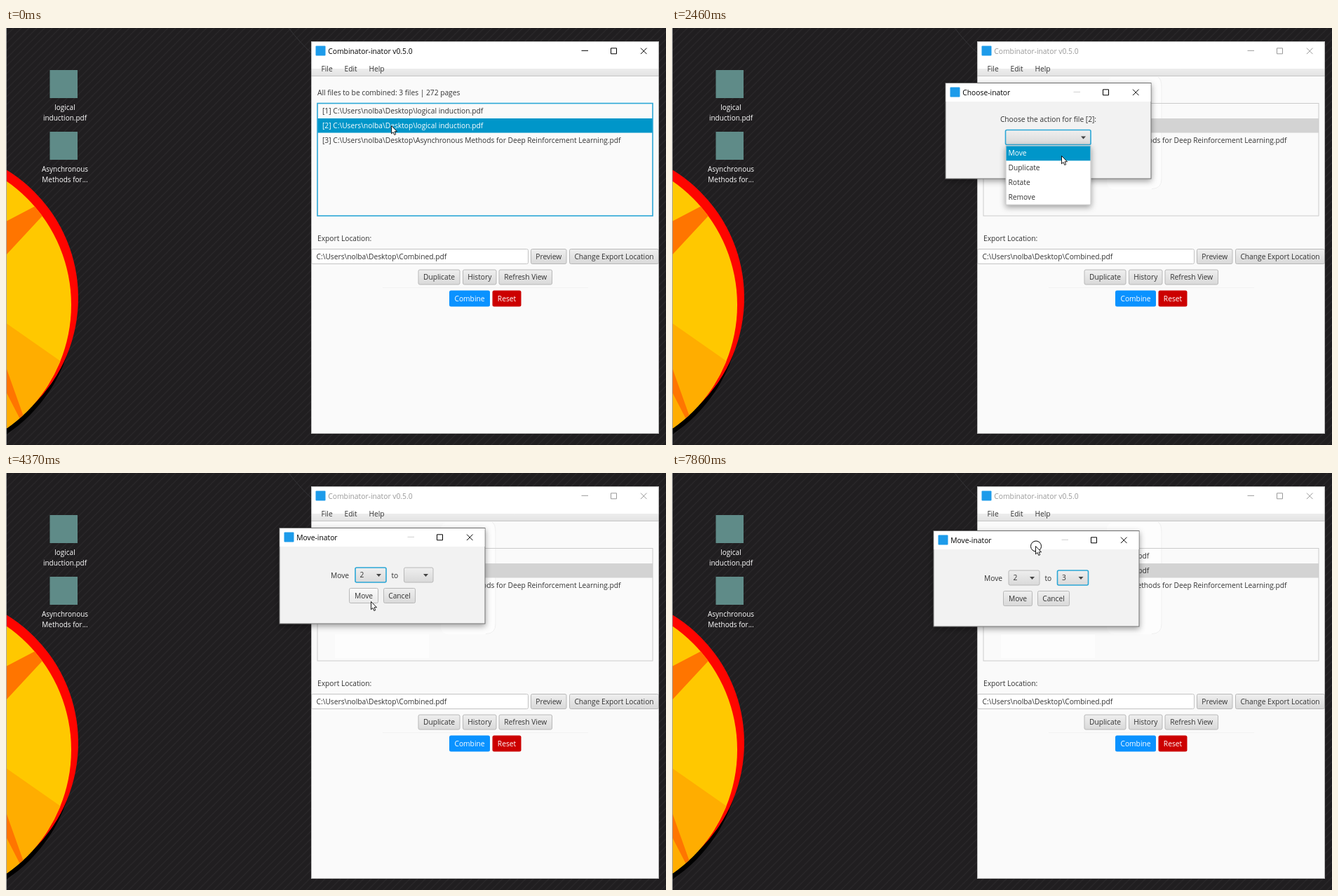
An HTML page for the animation above (8000 ms loop, 941 px wide and 595 px high).

```html
<!DOCTYPE html>
<html lang="en">
<head>
<meta charset="utf-8">
<title>Combinator-inator</title>
<style>
html, body { margin: 0; width: 100%; height: 100%; overflow: hidden; background: #201e20; }
svg { display: block; width: 941px; height: 595px; }
text { font: 10.22px "Open Sans", "Noto Sans", sans-serif; fill: #333; white-space: pre; }
.title { font-size: 10.3px; fill: #000; }
.icon-label { font-size: 10px; fill: #fff; text-anchor: middle; }
.mid { text-anchor: middle; }
.light { fill: #fff; }
.line { fill: none; stroke: #000; }
</style>
</head>
<body>
<svg viewBox="0 0 941 595">
  <defs>
    <pattern id="weave" width="11" height="11" patternUnits="userSpaceOnUse">
      <path d="M-2 13L13-2M-2 2L2-2M9 13L13 9" stroke="#292729" stroke-width="1.3"/>
    </pattern>
    <linearGradient id="face" x2="0" y2="1"><stop stop-color="#efefef"/><stop offset="1" stop-color="#d9d9d9"/></linearGradient>
    <linearGradient id="hot" x2="0" y2="1"><stop stop-color="#fafafa"/><stop offset="1" stop-color="#e9e9e9"/></linearGradient>
    <linearGradient id="menu" x2="0" y2="1"><stop stop-color="#ededed"/><stop offset="1" stop-color="#e3e3e3"/></linearGradient>
    <filter id="shadow" x="-20%" y="-20%" width="140%" height="150%">
      <feDropShadow dx="0" dy="3" stdDeviation="4" flood-opacity=".38"/>
    </filter>
    <clipPath id="disc"><circle cx="-122" cy="395" r="215"/></clipPath>
    <clipPath id="frame"><rect x="435" y="19" width="496" height="560"/></clipPath>
  </defs>
  <rect width="941" height="595" fill="#201e20"/>
  <rect width="941" height="595" fill="url(#weave)"/>
  <path d="M403 0Q420 22 436 36" fill="none" stroke="#343437"/>
  <circle cx="-120" cy="398" r="218"/>
  <circle cx="-111" cy="385" r="214" fill="#fe0500"/>
  <g clip-path="url(#disc)">
    <path d="M0 150H110V595H0z" fill="#ffc800"/>
    <path d="M0 276L42 254L62 256L52 268L0 324z" fill="#ff7500"/>
    <path d="M0 421L96 488V595H0z" fill="#ffad00"/>
    <path d="M0 484L26 557L20 558L0 519z" fill="#ff7500"/>
  </g>
  <path d="M.5 0V595" stroke="#a9a9a9"/>
  <g id="desktop"></g>
  <g id="main" clip-path="url(#frame)"></g>
  <g id="dialog"></g>
  <g id="pointer"></g>
</svg>
<script>
const LOOP = 8000;
const BLUE = '#0096c9', FOCUS = '#2ba7d6';
const PATH = 'C:\\Users\\nolba\\Desktop\\';
const ACTIONS = ['Move', 'Duplicate', 'Rotate', 'Remove'];

// Each step changes part of the state from its time onward.
const STEPS = [
  [0, { view: '', x: 549, y: 139, ring: 0, open: 0, hover: -1, action: '', target: '', hot: '', focus: 1, dx: 0, dy: 0, used: 0 }],
  [1120, { ring: 1 }],
  [1290, { view: 'choose', ring: 0 }],
  [1450, { x: 556, y: 147 }],
  [1620, { x: 563, y: 155 }],
  [1790, { x: 565, y: 158 }],
  [1910, { ring: 1 }],
  [2060, { ring: 0, open: 1 }],
  [2310, { x: 562, y: 173, hover: 0 }],
  [2450, { x: 555, y: 182 }],
  [2590, { x: 549, y: 192, hover: 1 }],
  [2730, { x: 547, y: 180, hover: 0 }],
  [3010, { open: 0, hover: -1, action: 'Move', ring: 1, used: 1 }],
  [3160, { ring: 0, hot: 'Cancel' }],
  [3590, { x: 541, y: 181 }],
  [3720, { x: 530, y: 182, hot: 'Move' }],
  [3840, { x: 522, y: 183 }],
  [3960, { x: 520, ring: 1 }],
  [4090, { view: 'move', ring: 0 }],
  [4620, { x: 525, y: 180 }],
  [4770, { x: 543, y: 168, hot: 'Cancel' }],
  [4900, { x: 568, y: 152, hot: '' }],
  [5030, { x: 585, y: 146 }],
  [5150, { x: 592, y: 144, ring: 1, focus: 2 }],
  [5280, { ring: 0, open: 1 }],
  [5560, { x: 593, y: 152 }],
  [5710, { y: 161, hover: 0 }],
  [5830, { x: 588, y: 180, hover: 1 }],
  [5980, { x: 580, y: 195 }],
  [6260, { x: 576, y: 201, hover: 2 }],
  [6440, { x: 574 }],
  [6600, { ring: 1 }],
  [6760, { open: 0, hover: -1, target: '3' }],
  [6920, { ring: 0 }],
  [7200, { x: 573, y: 190 }],
  [7320, { x: 558, y: 150 }],
  [7450, { x: 540, y: 110 }],
  [7590, { x: 535, y: 100, ring: 1 }],
  [7720, { x: 526, y: 102, dx: -9, dy: 2 }],
  [7860, { x: 518, y: 104, dx: -17, dy: 4 }]
];

const put = (id, html) => { document.getElementById(id).innerHTML = html; };
const rect = (x, y, w, h, fill, more = '') =>
  `<rect x="${x}" y="${y}" width="${w}" height="${h}" fill="${fill}" ${more}/>`;
// Text is placed by its vertical centre.
const text = (x, y, s, cls = '') => `<text x="${x}" y="${y + 3.8}" class="${cls}">${s}</text>`;
const arrow = (x, y) => `<path d="M${x - 3.5} ${y - 1.5}h7l-3.5 4z" fill="#444"/>`;

function button(x, y, w, label, hot) {
  return rect(x + .5, y + .5, w - 1, 21, hot ? 'url(#hot)' : 'url(#face)', 'rx="2" stroke="#b8b8b8"') +
    text(x + w / 2, y + 11, label, 'mid');
}

function solidButton(x, y, w, label, color) {
  return rect(x, y, w, 23, color, 'rx="2.5"') + text(x + w / 2, y + 11.3, label, 'mid light');
}

function combo(x, y, w, value, focused) {
  const edge = focused ? `stroke="${FOCUS}" stroke-width="1.6"` : 'stroke="#b8b8b8"';
  return rect(x + .5, y + .5, w - 1, 21, 'url(#face)', `rx="2" ${edge}`) +
    text(x + 7, y + 11, value) + arrow(x + w - 11, y + 11);
}

function popup(x, y, w, items, hover) {
  const row = 20.8;
  return rect(x + .5, y + .5, w - 1, items.length * row + 1, '#fff', 'stroke="#c2c2c2" filter="url(#shadow)"') +
    items.map((item, i) =>
      (i === hover ? rect(x + 1, y + 1 + i * row, w - 2, row, BLUE) : '') +
      text(x + 4, y + 11 + i * row, item, i === hover ? 'light' : '')).join('');
}

function titleBar(x, y, w, title, color, minColor) {
  const right = x + w;
  return rect(x + 6.5, y + 6.3, 14, 14, '#1d9bea', 'rx="1"') +
    `<text x="${x + 24.3}" y="${y + 17.3}" class="title" style="fill:${color}">${title}</text>` +
    `<path class="line" style="stroke:${minColor}" d="M${right - 110.5} ${y + 13}h9.5"/>` +
    `<path class="line" style="stroke:${color}" d="M${right - 68.5} ${y + 9.5}h8v8h-8zM${right - 26} ${y + 9.3}l8.5 8.5m0-8.5l-8.5 8.5"/>`;
}

function drawMain({ view, used }) {
  const active = !view;
  const ink = active ? '#000' : '#999';
  const files = ['logical induction', 'logical induction', 'Asynchronous Methods for Deep Reinforcement Learning'];
  put('main',
    rect(435, 19, 496, 560, '#fafafa') + rect(435, 19, 496, 39, '#fff') +
    titleBar(435, 19.3, 496, 'Combinator-inator v0.5.0', ink, ink) +
    rect(435, 58, 496, 10, 'url(#menu)') + rect(435, 68, 496, 1, '#c6c6c6') +
    text(449.5, 58, 'File') + text(482.5, 58, 'Edit') + text(517.5, 58, 'Help') +
    (active ? '' : rect(620, 70, 78, 160, '#fdfdfd', 'rx="10"') +
      '<path d="M684 229.5q14 0 14-14V86q0-14-5-16" fill="none" stroke="#efefef"/>') +
    (used ? rect(469, 230, 134, 34, '#fdfdfd') : '') +
    text(444, 92.5, 'All files to be combined: 3 files | 272 pages') +
    rect(444, 129, 478, 20.5, active ? BLUE : '#d3d3d3') +
    rect(444, 107.5, 478, 160.5, 'none', active ? `stroke="${FOCUS}" stroke-width="1.6"` : 'stroke="#cbcbcb"') +
    files.map((f, i) => text(451, 118.3 + i * 20.8, `[${i + 1}] ${PATH}${f}.pdf`, active && i === 1 ? 'light' : '')).join('') +
    text(444, 300.5, 'Export Location:') +
    rect(435.5, 315.5, 309, 21, '#fff', 'rx="2" stroke="#c4c4c4"') +
    text(442.5, 326.3, PATH + 'Combined.pdf') +
    button(748, 315, 51.5, 'Preview') + button(803, 315, 128, 'Change Export Location') +
    rect(537, 370, 293, 1, '#f2f2f2') +
    button(587.5, 344.5, 60, 'Duplicate') + button(651, 344.5, 48.5, 'History') + button(702.5, 344.5, 76.5, 'Refresh View') +
    solidButton(632, 374.5, 58, 'Combine', '#0a92ff') + solidButton(693.5, 374.5, 41, 'Reset', '#cc0000') +
    rect(435.5, 19.5, 495, 559, 'none', 'stroke="#8a8a8a" stroke-opacity=".55"'));
}

function chooseForm({ action, open, hover, hot }) {
  return text(536.5, 130.5, 'Choose the action for file [2]:', 'mid') +
    combo(475, 145, 122.5, action, true) +
    (action
      ? button(489, 175, 42, 'Move', hot === 'Move') + button(538, 175, 46, 'Cancel', hot === 'Cancel')
      : `<g opacity=".4">${button(485, 175, 50, 'Choose')}</g>` + button(542.5, 175, 46, 'Cancel')) +
    (open ? popup(475.5, 167.5, 122, ACTIONS, hover) : '');
}

function moveForm({ target, open, hover, hot, focus }) {
  const shift = target ? -1 : 0;
  return text(463 + shift, 145.8, 'Move') + combo(497.5 + shift, 134.5, 45, '2', focus === 1) +
    text(549.5 + shift, 145.8, 'to') + combo(567 + shift, 134.5, target ? 45 : 42.5, target, focus === 2) +
    button(489, 164, 42, 'Move', hot === 'Move') + button(538, 164, 46, 'Cancel', hot === 'Cancel') +
    (open ? popup(567, 157, 42, ['1', '2', '3'], hover) : '');
}

function drawDialog(s) {
  if (!s.view) return put('dialog', '');
  const choose = s.view === 'choose';
  put('dialog', `<g transform="translate(${s.dx} ${s.dy})">` +
    rect(390, 78.5, 293, 136.5, '#f2f2f2', 'stroke="#6e6e6e" filter="url(#shadow)"') +
    rect(390.5, 79, 292, 26, '#fff') +
    titleBar(390, 78.3, 293, choose ? 'Choose-inator' : 'Move-inator', '#000', '#cfcfcf') +
    (choose ? chooseForm(s) : moveForm(s)) + '</g>');
}

function drawPointer({ x, y, ring }) {
  put('pointer', `<g transform="translate(${x} ${y})">` +
    (ring ? '<circle class="line" cx="1" cy=".5" r="7.5"/>' : '') +
    '<path d="M.5 .5V11.8L3 9.5L4.8 13.5L6.7 12.7L5 8.8H8.5z" fill="#fff" stroke="#000" stroke-width=".9"/></g>');
}

put('desktop', [[60, 'logical', 'induction.pdf'], [148, 'Asynchronous', 'Methods for...']].map(([y, a, b]) =>
  rect(62.5, y, 39.5, 40, '#5f8b88') +
  text(84, y + 53.5, a, 'icon-label') + text(84, y + 67.8, b, 'icon-label')).join(''));

let merged = {};
const states = STEPS.map(([, change]) => (merged = { ...merged, ...change }));
const start = performance.now();
let shown = -1;

function tick() {
  const t = (performance.now() - start) % LOOP;
  const now = STEPS.findLastIndex(([at]) => at <= t);
  if (now !== shown) {
    shown = now;
    drawMain(states[now]);
    drawDialog(states[now]);
    drawPointer(states[now]);
  }
  requestAnimationFrame(tick);
}
tick();
</script>
</body>
</html>
```
